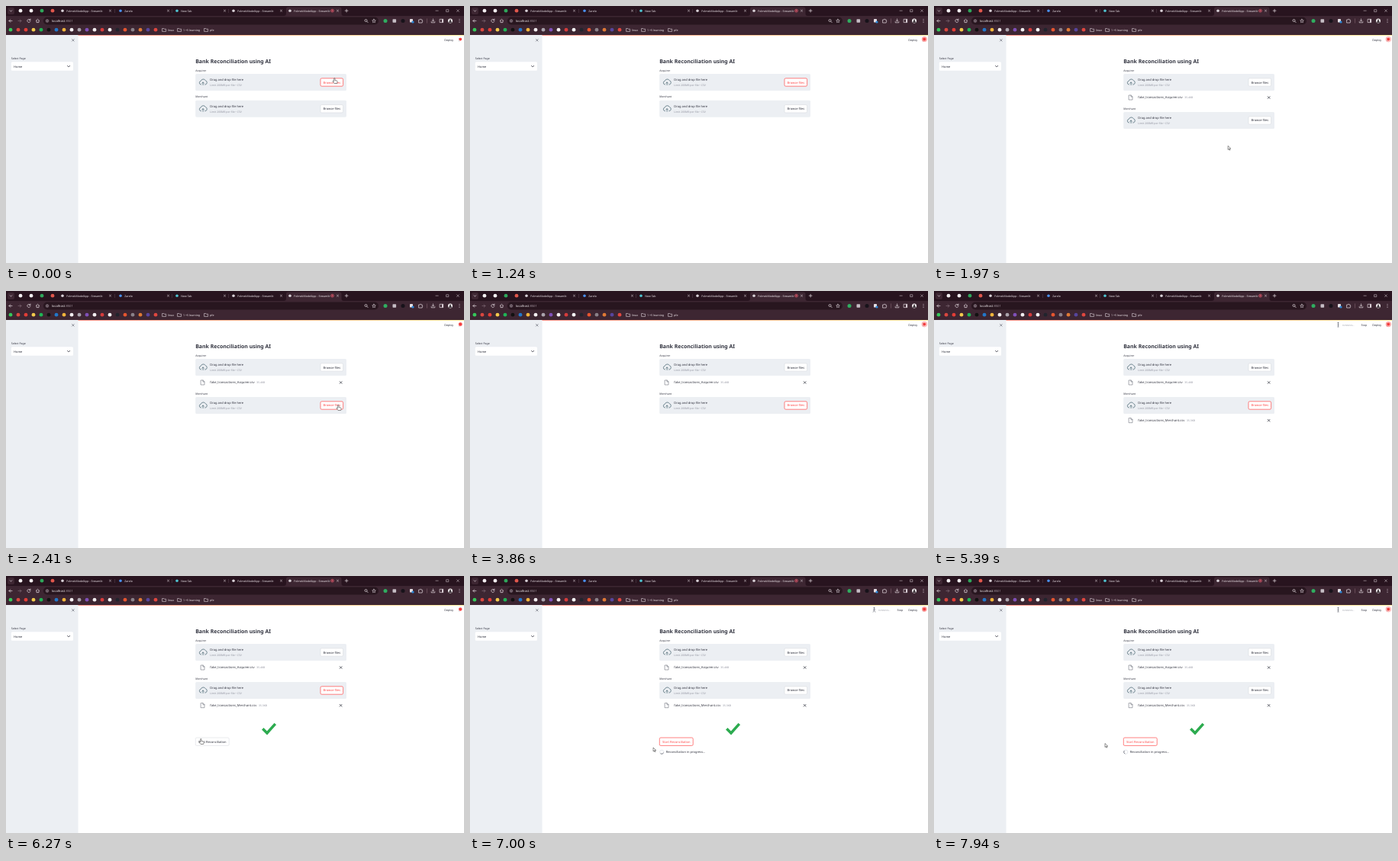
Animation of 600 by 337 pixels, one loop 8000 ms. Source, as an HTML page:

```html
<!DOCTYPE html>
<html lang="en">
<head>
<meta charset="utf-8">
<title>Bank Reconciliation</title>
<style>
  html, body { margin: 0; width: 100%; height: 100%; overflow: hidden; background: #fff; }
  svg { display: block; width: 100vw; height: 100vh; font-family: "Noto Sans", "Open Sans", sans-serif; text-rendering: geometricPrecision; }
  .line { fill: none; stroke-linecap: round; stroke-linejoin: round; }
  .button rect { fill: #fff; stroke: #d3d5da; stroke-width: .5; }
  .button text { fill: #31333f; }
  .button.hot rect { stroke: #ff4b4b; stroke-width: .7; }
  .button.hot text { fill: #ff4b4b; }
</style>
</head>
<body>
<svg id="stage" viewBox="0 0 600 337" preserveAspectRatio="none"></svg>
<script>
const LOOP = 8000;
const INK = '#31333f', MUTED = '#9294a0', PANEL = '#eceff3', PALE = '#e3d8df';

const text = (x, y, s, size = 4, fill = INK, extra = '') =>
  `<text x="${x}" y="${y}" font-size="${size}" fill="${fill}" ${extra}>${s}</text>`;
const rect = (x, y, w, h, fill, r = 0, extra = '') =>
  `<rect x="${x}" y="${y}" width="${w}" height="${h}" rx="${r}" fill="${fill}" ${extra}/>`;
const dot = (x, y, r, fill, extra = '') =>
  `<circle cx="${x}" cy="${y}" r="${r}" fill="${fill}" ${extra}/>`;
const line = (d, color = PALE, w = .7, extra = '') =>
  `<path class="line" d="${d}" stroke="${color}" stroke-width="${w}" ${extra}/>`;
const cross = (x, y, r, color, w) =>
  line(`M${x - r} ${y - r}l${2 * r} ${2 * r}m0 ${-2 * r}l${-2 * r} ${2 * r}`, color, w);
const button = (id, x, y, w, label) =>
  `<g id="${id}" class="button">${rect(x, y, w, 10.4, '#fff', 1.6)}${text(x + w / 2, y + 6.7, label, 4.05, '', 'text-anchor="middle"')}</g>`;

function tabStrip() {
  const appTitle = 'FolmekModelApp - Streamlit';
  const tabs = [
    [74, appTitle, '#d8d0d6'], [150, 'Zarelo', '#4a90f0'], [224, 'New Tab', '#4fc3d0'],
    [298, appTitle, '#d8d0d6'], [372, appTitle, '#d8d0d6'],
  ];
  const pinned = [[19, '#f2eef0'], [33, '#f2eef0'], [47, '#2fa65a'], [61, '#e0574c']];
  return rect(0, 0, 600, 13, '#28141f') +
    rect(2, 2, 9, 9, '#3d2632', 2) + line('M5 5.7l1.5 1.4l1.5-1.4') +
    `<path d="M364 13q3 0 3-3V4q0-2.500 2.500-2.500H437q2.500 0 2.500 2.500V10q0 3 3 3Z" fill="#3d2632"/>` +
    pinned.map(([x, c]) => dot(x, 6.2, 2.4, c)).join('') +
    tabs.map(([x, title, c]) => dot(x, 6.3, 1.8, c) +
      text(x + 5.3, 7.7, title, 3.55, '#eee6eb') + cross(x + 62.500, 6.2, 1.1, '#d6c9d0', .6)).join('') +
    [142, 217, 291].map(x => rect(x, 4, .5, 5, '#5b4552')).join('') +
    dot(427.5, 6.2, 1.9, 'none', 'stroke="#ef5d70" stroke-width=".7"') + dot(427.5, 6.2, .9, '#ef5d70') +
    line('M444.200 6.2h3.800M446.100 4.300v3.800') +
    line('M563 6.2h3.200', PALE, .5) + line('M577 4.800h2.800v2.800h-2.800z', PALE, .5) + cross(592, 6.2, 1.4, PALE, .5);
}

function toolbar() {
  return rect(0, 13, 600, 25, '#3d2632') + rect(49, 14.5, 439, 10, '#28161f', 5) +
    line('M8 19.500H4m1.800-1.800L4 19.500l1.800 1.800') +
    line('M16 19.500h4m-1.800-1.800L20 19.500l-1.800 1.800', '#806a76') +
    line('M31.700 18.200a2.100 2.100 0 1 0 .3 1.800M32 17v1.600h-1.700') +
    line('M39.400 19.300l2.100-2l2.100 2M40 19v2.600h3V19') +
    dot(54, 19.5, 2.7, '#3f2c37') + dot(54, 19.5, 1.4, 'none', `stroke="${PALE}" stroke-width=".5"`) +
    `<text x="60" y="21" font-size="4.1" fill="#f3edf0">localhost<tspan fill="#a595a0">:8501</tspan></text>` +
    dot(471.5, 19, 1.5, 'none', `stroke="${PALE}" stroke-width=".7"`) + line('M472.700 20.200l1.500 1.500') +
    line('M482 17.200l.7 1.500 1.600.2-1.200 1.100.3 1.600-1.400-.8-1.400.8.3-1.600-1.200-1.100 1.600-.2z', PALE, .6) +
    dot(497, 19.5, 2.5, '#2fae60') + rect(506.5, 17.2, 4.600, 4.600, '#c6bec5', .7) +
    dot(520, 19.5, 2.5, '#17121a') + rect(529, 17, 4, 4.500, '#e4dfe4', .7) + dot(533, 21, 1.6, '#2b88d8') +
    line('M541 18h1.300a.8.8 0 0 1 1.600 0h1.300v1.300a.7.7 0 0 1 0 1.400V22h-4.200z') +
    rect(551, 16.5, .6, 6, '#81636f') +
    line('M559.500 17v3m-1.300-1.200l1.300 1.300l1.300-1.300M557.200 20.500v1.300h4.600v-1.300') +
    line('M568.500 17.300h4.200v4.300h-4.200z') + rect(571, 17.3, 1.7, 4.300, PALE) +
    dot(582, 19.5, 3, '#efeaec') + dot(582, 18.700, 1, '#20161d') + `<path d="M580 21.800a2 2 0 0 1 4 0z" fill="#20161d"/>` +
    [17.5, 19.5, 21.5].map(y => dot(594, y, .5, PALE)).join('');
}

function bookmarks() {
  const colors = '#35c75a #d9473f #e23d36 #f2c94c #1fb455 #111 #2277c9 #f0b43c #f2eef0 #aaa4ad #8050b8 #f2eef0 #d63c3c #f5f5f5 #20242d #e6552f #8a8189 #df7a35 #56459d #e0473f'.split(' ');
  const folders = [[205, 'linux'], [225, '1 +5 learning'], [260, 'pfe']];
  return colors.map((c, i) => dot(6 + i * 10, 31.2, 2.4, c)).join('') +
    folders.map(([x, label]) => line(`M${x} 29.500h1.700l.6.700h2.300v3.200h-4.600z`, PALE, .6) +
      text(x + 7, 32.600, label, 3.6, '#eee6eb')).join('');
}

function sidebar() {
  return rect(0, 38, 94.5, 299, PANEL) + cross(87.8, 44.8, 1.3, '#555865', .65) +
    text(6.8, 70.2, 'Select Page', 3.5) + rect(6.8, 73.2, 81.2, 11.6, '#fff', 1.5) +
    text(10, 80.6, 'Home') + line('M80.500 78.300l1.600 1.600l1.600-1.600', INK, .8);
}

function uploader(id, label, top) {
  const mid = top + 11;
  return text(248.3, top - 3.4, label, 3.5) + rect(248.2, top, 197.8, 22, PANEL, 1.6) +
    line(`M255.500 ${mid + 3}h-.200a2.400 2.400 0 0 1 0-4.700a3.300 3.300 0 0 1 6.100-.500a2.700 2.700 0 0 1-.200 5.200h-.500M258.100 ${mid + 3.600}v-3.500m-1.300 1.100l1.300-1.300l1.300 1.300`, '#56707c', .8) +
    text(267.3, mid - 1.8, 'Drag and drop file here') +
    text(267.3, mid + 5.2, 'Limit 200MB per file • CSV', 3.45, MUTED) +
    button(id, 412, mid - 5.200, 29.6, 'Browse files');
}

function fileRow(id, y, name, size, sizeX) {
  return `<g id="${id}">` +
    line(`M255.500 ${y - 3}h2.600l1.900 1.900v4.100h-4.500zM258 ${y - 3}v2h2`, '#6f727d', .6) +
    text(267.3, y + 1.2, name, 4.1) + text(sizeX, y + 1.2, size, 3.4, MUTED) +
    cross(438.6, y, 1.4, INK, .75) + '</g>';
}

const status = `<g id="status">${dot(529.5, 41.700, .9, '#777a84')}
  ${line('', '#777a84', .7, 'id="runner"')}
  ${text(535, 45.6, 'RUNNING...', 2.9, '#a5a7b0')}${text(559.5, 45.700, 'Stop', 3.6)}</g>`;

const pointers = `<g id="pointer" stroke="#222" stroke-width=".5" stroke-linejoin="round" fill="#fff">
  <path id="hand" d="M-1.300-3.200q.7-.7 1.300 0V-.500l2.300.500q1 .3.900 1.200l-.6 2.300H-.900L-3 .900q-.2-.9.700-.8l1 .8z"/>
  <path id="arrow" d="M0-2.500v5l1.200-1.100.8 1.800.8-.3-.8-1.800h1.700z"/></g>`;

const byId = id => document.getElementById(id);

byId('stage').innerHTML =
  `<defs><linearGradient id="warm"><stop stop-color="#ff6b5b"/><stop offset="1" stop-color="#fff080"/></linearGradient></defs>` +
  rect(0, 0, 600, 337, '#fff') + tabStrip() + toolbar() + bookmarks() +
  rect(94, 38, 506, .7, 'url(#warm)') + sidebar() +
  status + text(574.300, 45.700, 'Deploy', 3.65) +
  [42.5, 44.2, 45.9].map(y => dot(593.8, y, .4, INK)).join('') +
  dot(595.3, 43.6, 2, '#ff4b4b', 'id="halo"') + dot(595.3, 43.6, 1.8, '#f23b3b') +
  text(248.2, 74.8, 'Bank Reconciliation using AI', 6.95, INK, 'font-weight="600"') +
  uploader('browseA', 'Acquirer', 89) +
  fileRow('fileA', 120, 'fake_transactions_Acquirer.csv', '35.4KB', 328.3) +
  `<g id="merchant">${uploader('browseB', 'Merchant', 123.7)}</g>` +
  fileRow('fileB', 169.7, 'fake_transactions_Merchant.csv', '35.3KB', 331) +
  `<g id="ready"><path d="M336.300 200.300L342 206L352.800 193.800" fill="none" stroke="#2cab4f" stroke-width="3.500"/>` +
  button('start', 248.3, 212, 43.900, 'Start Reconciliation') + '</g>' +
  `<g id="progress">${dot(251.2, 230.8, 2.6, 'none', 'stroke="#dfe1e6" stroke-width=".8"')}
   ${line('M251.200 228.200a2.600 2.600 0 0 1 2.600 2.600', '#70737d', .8, 'id="spinner"')}
   ${text(256.800, 232.2, 'Reconciliation in progress...')}</g>` + pointers;

// Each stroke of the pointer: start, end, from, to
const moves = [
  [0, 350, 431, 98, 431, 98],
  [1960, 2330, 385, 186, 436, 153],
  [2330, 2850, 436, 153, 436, 153],
  [5500, 6200, 330, 150, 256, 217],
  [6200, 6800, 256, 217, 256, 217],
  [6800, 7250, 256, 217, 218, 242],
  [7250, 7750, 218, 242, 224, 222],
  [7750, LOOP, 224, 222, 224, 222],
];
const show = (id, on) => byId(id).setAttribute('visibility', on ? 'visible' : 'hidden');
const heat = (id, on) => byId(id).classList.toggle('hot', on);
const within = (t, a, b) => t >= a && t < b;
const ease = p => p * p * (3 - 2 * p);

function drawPointer(t) {
  const move = moves.find(([a, b]) => within(t, a, b));
  if (!move) { show('hand', false); show('arrow', false); return; }
  const [a, b, x0, y0, x1, y1] = move, p = ease((t - a) / (b - a));
  const x = x0 + (x1 - x0) * p, y = y0 + (y1 - y0) * p;
  const overButton = (x > 412 && x < 442 && y < 160) || (x > 248 && x < 292 && y > 212 && y < 222);
  byId('pointer').setAttribute('transform', `translate(${x} ${y})`);
  show('hand', overButton);
  show('arrow', !overButton);
}

function draw(t) {
  const hasA = t >= 1890, hasB = t >= 4850, ready = t >= 5600, started = t >= 6600;
  show('fileA', hasA);
  show('fileB', hasB);
  show('ready', ready);
  show('progress', started);
  show('status', within(t, 4850, 5600) || started);
  byId('merchant').setAttribute('transform', `translate(0 ${hasA ? 15.3 : 0})`);
  heat('browseA', !hasA);
  heat('browseB', within(t, 2300, 6600));
  heat('start', t >= 6340);

  const stride = 2 * Math.sin(t / 90);
  byId('runner').setAttribute('d',
    `M529.500 42.800v2.200l${stride} 2.300M529.500 45l${-stride} 2.300M${529.5 - stride} 44.600l${stride}-1.300l${stride} .8`);
  byId('spinner').setAttribute('transform', `rotate(${t * .48} 251.200 230.800)`);

  const pulse = t % 2000 / 2000;
  byId('halo').setAttribute('r', 1.8 + 2 * (1 - (1 - pulse) ** 2));
  byId('halo').setAttribute('opacity', .75 - .4 * pulse);
  drawPointer(t);
}

const began = performance.now();
(function tick() {
  draw((performance.now() - began) % LOOP);
  requestAnimationFrame(tick);
})();
</script>
</body>
</html>
```
